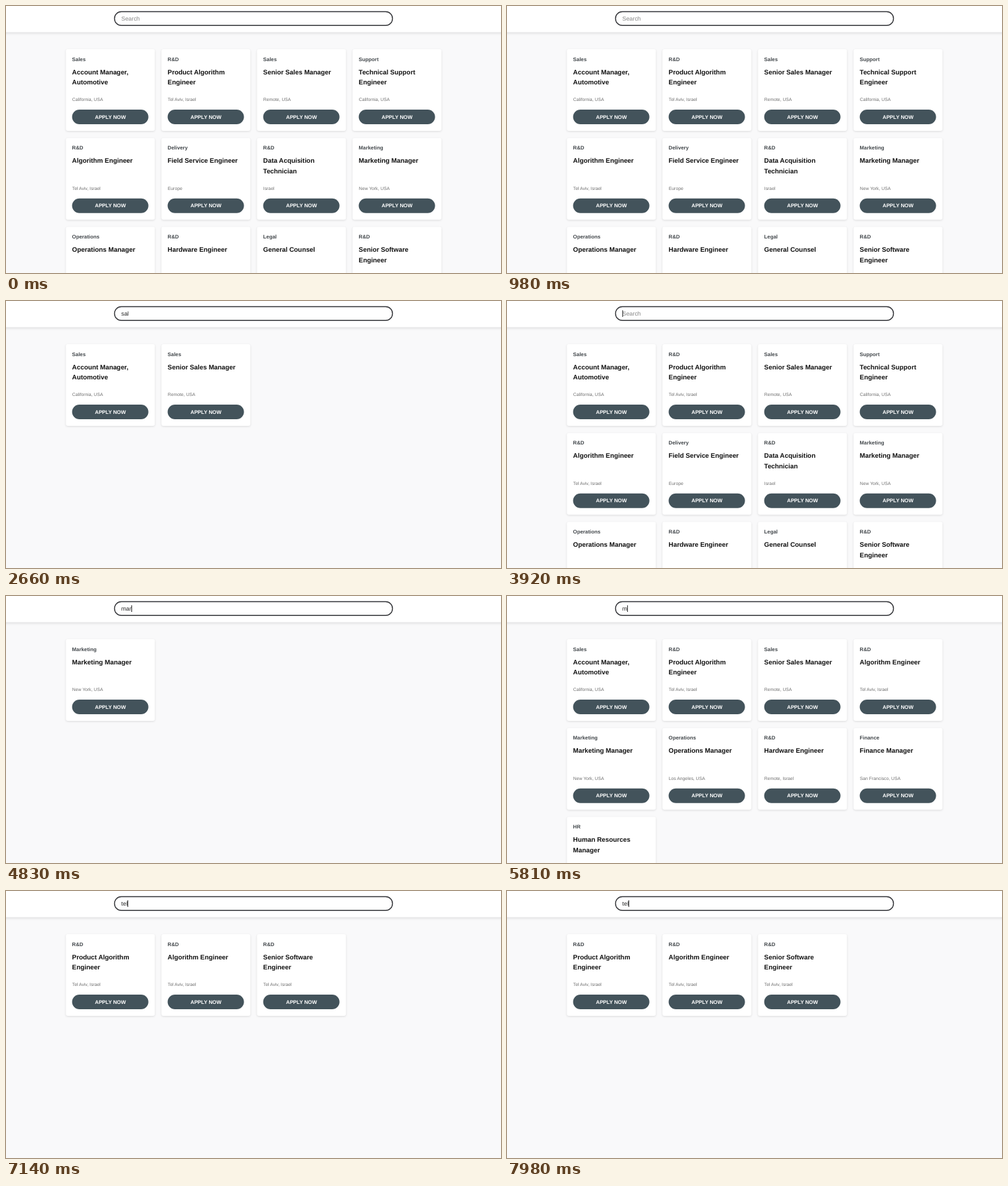
Recreate the animation shown at these times as an HTML page. Size 746 px wide and 402 px high, loop 8000 ms.

```html
<!DOCTYPE html>
<html lang="en">
<head>
<meta charset="utf-8">
<title>Open positions</title>
<style>
  html, body { margin: 0; width: 100%; height: 100%; overflow: hidden; background: #f9f9fa; }
  svg { display: block; width: 746px; height: 402px; text-rendering: geometricPrecision; }
  text { font-family: 'Liberation Sans', Arial, sans-serif; }
  .bar { fill: #fff; filter: drop-shadow(0 1px 2px rgba(0, 0, 0, .14)); }
  .field { fill: #fff; stroke: #333438; stroke-width: 1.4; }
  .query { font-size: 8.8px; fill: #222; }
  .query.empty { fill: #858585; }
  .card { fill: #fff; filter: drop-shadow(0 1px 1.5px rgba(0, 0, 0, .12)); }
  .team { font-size: 7.8px; font-weight: 700; fill: #43484c; }
  .title { font-size: 9.85px; font-weight: 700; fill: #111; }
  .place { font-size: 6.8px; fill: #707070; }
  .button { fill: #43535b; }
  .apply { font-size: 7.85px; font-weight: 700; fill: #fff; text-anchor: middle; }
</style>
</head>
<body>
<svg viewBox="0 0 746 402">
  <rect width="746" height="402" fill="#f9f9fa"/>
  <g id="grid"></g>
  <rect class="bar" x="-10" y="-10" width="766" height="49.5"/>
  <rect class="field" x="163.5" y="8.5" width="419" height="20.8" rx="10.4"/>
  <text id="query" class="query" x="173.8" y="22"></text>
  <rect id="caret" y="14" width="1" height="10" fill="#222"/>
</svg>
<script>
const LOOP = 8000;
const BLINK = 500;

// team, title (| breaks the line), place
const jobs = [
  ['Sales', 'Account Manager,|Automotive', 'California, USA'],
  ['R&D', 'Product Algorithm|Engineer', 'Tel Aviv, Israel'],
  ['Sales', 'Senior Sales Manager', 'Remote, USA'],
  ['Support', 'Technical Support|Engineer', 'California, USA'],
  ['R&D', 'Algorithm Engineer', 'Tel Aviv, Israel'],
  ['Delivery', 'Field Service Engineer', 'Europe'],
  ['R&D', 'Data Acquisition|Technician', 'Israel'],
  ['Marketing', 'Marketing Manager', 'New York, USA'],
  ['Operations', 'Operations Manager', 'Los Angeles, USA'],
  ['R&D', 'Hardware Engineer', 'Remote, Israel'],
  ['Legal', 'General Counsel', 'New York, USA'],
  ['R&D', 'Senior Software|Engineer', 'Tel Aviv, Israel'],
  ['Finance', 'Finance Manager', 'San Francisco, USA'],
  ['HR', 'Human Resources|Manager', 'California, USA']
];

// time of each keystroke and the query it leaves
const edits = [
  [-800, ''],
  [1500, 's'], [1690, 'sa'], [1880, 'sal'],
  [3250, 'sa'], [3400, 's'], [3550, ''],
  [4300, 'm'], [4500, 'ma'], [4700, 'mar'],
  [5600, 'ma'], [5740, 'm'], [5880, ''],
  [6640, 't'], [6715, 'te'], [6900, 'tel']
];

const grid = document.getElementById('grid');
const queryText = document.getElementById('query');
const caret = document.getElementById('caret');

function add(parent, tag, attrs, text = '') {
  const node = document.createElementNS('http://www.w3.org/2000/svg', tag);
  for (const name in attrs) node.setAttribute(name, attrs[name]);
  node.textContent = text;
  parent.append(node);
  return node;
}

function makeCard([team, title, place]) {
  const card = add(grid, 'g', {});
  add(card, 'rect', { class: 'card', width: 134, height: 123, rx: 3 });
  add(card, 'text', { class: 'team', x: 9.3, y: 17.8 }, team);
  title.split('|').forEach((line, i) =>
    add(card, 'text', { class: 'title', x: 9.3, y: 37.7 + i * 15.6 }, line));
  add(card, 'text', { class: 'place', x: 9.5, y: 78.1 }, place);
  add(card, 'rect', { class: 'button', x: 9.3, y: 91, width: 115, height: 22, rx: 11 });
  add(card, 'text', { class: 'apply', x: 67, y: 104.8 }, 'APPLY NOW');
  return { card, words: [team, title.replace('|', ' '), place].map(s => s.toLowerCase()) };
}

const cards = jobs.map(makeCard);
let shown = null;
let caretX = 0;

function search(query) {
  shown = query;
  let slot = 0;
  for (const { card, words } of cards) {
    const match = words.some(word => word.includes(query));
    card.style.display = match ? '' : 'none';
    if (!match) continue;
    const x = 90.3 + slot % 4 * 144;
    const y = 65 + Math.floor(slot / 4) * 133.7;
    card.setAttribute('transform', `translate(${x} ${y})`);
    slot++;
  }
  queryText.textContent = query || 'Search';
  queryText.classList.toggle('empty', !query);
  caretX = 173.8 + (query ? queryText.getComputedTextLength() : 0);
  caret.setAttribute('x', caretX);
}

function draw() {
  const time = performance.now() % LOOP;
  const [since, query] = edits.filter(([at]) => at <= time).pop();
  if (query !== shown) search(query);
  caret.style.display = (time - since) % (2 * BLINK) < BLINK ? '' : 'none';
  requestAnimationFrame(draw);
}
draw();
</script>
</body>
</html>
```
